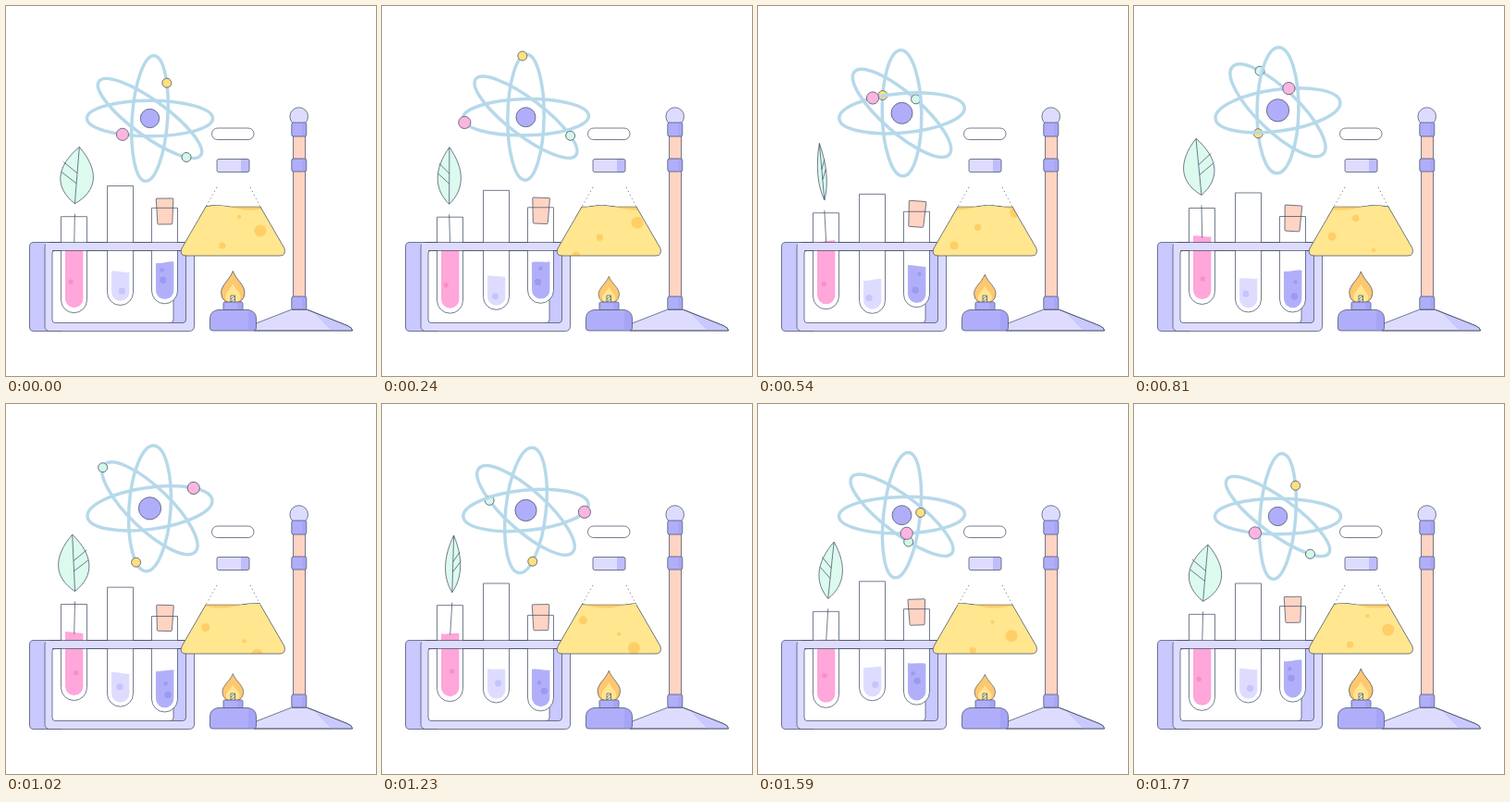
Write an HTML page that moves like this. It is 400x400 px and loops after 1800 ms.

```html
<!DOCTYPE html>
<html lang="en">
<head>
<meta charset="utf-8">
<title>Chemistry set</title>
<style>
  html, body { margin: 0; width: 100%; height: 100%; overflow: hidden; background: #fff; }
  svg { display: block; width: 100%; height: 100%; }
  .ink { stroke: #465068; stroke-width: .75; stroke-linejoin: round; }
  .line { fill: none; }
  .pale { fill: #dddcff; }
  .mid { fill: #c9c8ff; }
  .deep { fill: #b0aefa; }
  .shade { fill: #9c9af0; }
  .skin { fill: #ffd4c2; }
  .orbit { fill: none; stroke: #b6d9ea; stroke-width: 3.5; }
  .glass { fill: #fff; }
  .orange { fill: #ffce66; }
  .rim { stroke-width: 1.3; paint-order: stroke; }
  .leaf path { vector-effect: non-scaling-stroke; }
</style>
</head>
<body>
<svg viewBox="0 0 400 400" xmlns="http://www.w3.org/2000/svg">
  <defs>
    <clipPath id="flaskClip">
      <path d="M216 205H275V217L301 262Q303 270 296 270H195Q187 270 190 262L216 217Z"/>
    </clipPath>
    <clipPath id="brewClip"><path id="brewEdge"/></clipPath>
  </defs>

  <!-- atom -->
  <g id="atom">
    <g id="diag"><ellipse class="orbit" rx="68" ry="20"/><circle class="ink" r="5" fill="#d3f8e8"/></g>
    <g id="tall"><ellipse class="orbit" rx="68" ry="20"/><circle class="ink" r="5" fill="#ffe07f"/></g>
    <g id="flat"><ellipse class="orbit" rx="68" ry="20"/><circle class="ink" r="6.6" fill="#fbb6e0"/></g>
    <circle id="nucleus" class="ink deep" r="10"/>
  </g>

  <!-- rack, back part -->
  <path class="ink mid" d="M30 255.500H60V351.500H30Q25.500 351.500 25.500 347V260Q25.500 255.500 30 255.500Z"/>
  <rect class="ink pale" x="42" y="255.500" width="161.500" height="96" rx="5"/>
  <path class="ink mid" d="M176 264.500H194.500V339Q194.500 342.500 191 342.500H176Z"/>
  <path class="ink glass" d="M53 264.500H181V339Q181 342.500 178 342.500H53Q50 342.500 50 339V267Q50 264.500 53 264.500Z"/>

  <!-- leaf and tubes -->
  <g id="leaf" class="leaf">
    <path class="ink" fill="#dcfaee" d="M0 0C-25-16-25-38 0-61.500C25-38 25-16 0 0Z"/>
    <path class="ink line" d="M0-61.500V0M-16.500-44L0-33M-18-33L0-22"/>
  </g>
  <g id="tube1">
    <path class="glass" d="M59.500 0H87.500V90A14 14 0 0 1 59.500 90Z"/>
    <path id="liquid1" fill="#ffa6da"/>
    <circle id="drop1" r="2.700" fill="#f78fcb"/>
    <path id="stem" class="ink line"/>
    <path class="ink line" d="M59.500 0H87.500V90A14 14 0 0 1 59.500 90Z"/>
  </g>
  <g id="tube2">
    <path class="glass ink" d="M109.500 0H137.500V115A14 14 0 0 1 109.500 115Z"/>
    <path id="liquid2" fill="#dddcff"/>
    <circle id="drop2" r="3.600" fill="#c6c4fd"/>
  </g>
  <path id="back3" class="glass" d="M157.500 0H185.500V89.500A14 14 0 0 1 157.500 89.500Z"/>
  <path id="cork" class="ink skin" d="M-8.500-14H8.500Q9.500-14 9.300-13L8 13Q8 14 7 14H-7Q-8 14-8 13L-9.300-13Q-9.500-14-8.500-14Z"/>
  <g id="tube3">
    <path id="liquid3" fill="#b1affa"/>
    <circle id="drop3" class="shade" r="3.700"/>
    <circle id="drop4" class="shade" r="2.200"/>
    <path class="ink line" d="M157.500 0H185.500V89.500A14 14 0 0 1 157.500 89.500Z"/>
  </g>

  <!-- rack, front bar -->
  <path class="pale" d="M43 256H199Q203 256 203 260V264H43Z"/>
  <path class="ink line" d="M47 255.500H199Q203.500 255.500 203.500 260M50 264.500H194.500"/>

  <!-- flask -->
  <rect class="ink glass" x="222.500" y="132" width="45.500" height="12.500" rx="6.200"/>
  <rect class="pale" x="228" y="165.500" width="35" height="14" rx="2"/>
  <path class="deep" d="M254 165.500H261Q263 165.500 263 167.500V177.500Q263 179.500 261 179.500H254Z" opacity=".7"/>
  <rect class="ink line" x="228" y="165.500" width="35" height="14" rx="2"/>
  <path class="ink line" stroke-dasharray="1.200 3.200" d="M228 196L216 217M264 196L275 217"/>
  <g clip-path="url(#flaskClip)">
    <use href="#brewEdge" class="ink line rim"/>
    <rect class="ink orange rim" x="185" y="217.300" width="120" height="10"/>
    <path id="brew" fill="#ffe68f"/>
    <g id="bubbles" class="orange" clip-path="url(#brewClip)"></g>
  </g>
  <path class="ink line" d="M216 217L190 262Q187 270 195 270H296Q303 270 301 262L275 217"/>

  <!-- stand -->
  <path class="ink pale" d="M309 328H325L369 345.500Q374.500 347.500 374.500 351H268V344Z"/>
  <path class="mid" d="M334 333L369 346Q374 348 374 350.600H351Z"/>
  <path class="ink line" d="M309 328H325L369 345.500Q374.500 347.500 374.500 351H268"/>
  <rect class="ink skin" x="310.500" y="135" width="13" height="185"/>
  <circle class="ink pale" cx="316.700" cy="119.500" r="9.800"/>
  <g id="collars"></g>

  <!-- burner -->
  <g id="flame">
    <path class="ink" fill="#ffc870" d="M0-34C3.500-24 12.500-19 12.500-10Q12.500-4 7.500 0H-7.500Q-12.500-4-12.500-10C-12.500-19-3.500-24 0-34Z"/>
    <path fill="#ffe68f" d="M0-20C3-13 8-11 8-5Q8-2 5 0H-5Q-8-2-8-5C-8-11-3-13 0-20Z"/>
  </g>
  <rect class="ink" x="243" y="313" width="4.500" height="8" fill="#fff3cf"/>
  <path class="ink line" d="M243 317L247.500 313.500M243 320L247.500 316.500"/>
  <rect class="ink deep" x="235" y="320" width="21" height="9" rx="1.500"/>
  <path class="ink deep" d="M229 328.500H262Q270.500 330 270.500 338V348Q270.500 351 267.500 351H223.500Q220.500 351 220.500 348V338Q220.500 330 229 328.500Z"/>
  <path class="shade" opacity=".45" d="M250 320.500H255.500V328H250ZM262 329Q270 331 270 338V348Q270 350.500 267 350.500H262Z"/>
</svg>

<script>
const LOOP = 1800, STEP = 30, TAU = Math.PI * 2;
const NS = "http://www.w3.org/2000/svg";
const $ = id => document.getElementById(id);
let t = 0;

const wrap = v => ((v % 1) + 1) % 1;
const clamp = v => Math.min(1, Math.max(0, v));
const osc = (mid, amp, peak, period = LOOP) => mid + amp * Math.cos(TAU * (t - peak) / period);
const put = (id, value) => $(id).setAttribute("transform", value);
const shape = (id, d) => $(id).setAttribute("d", d);

function add(parent, tag, attrs) {
  const el = document.createElementNS(NS, tag);
  for (const key in attrs) el.setAttribute(key, attrs[key]);
  return $(parent).appendChild(el);
}

for (const [y, h] of [[126, 15], [165, 14], [314, 14]]) {
  add("collars", "rect", { class: "ink deep", x: 308.8, y, width: 16, height: h, rx: 2 });
  add("collars", "rect", { class: "shade", x: 320.5, y: y + .6, width: 3.6, height: h - 1.2, opacity: .45 });
}

// Start of the rise in ms, x there, sideways drift, radius
const bubbles = [[841, 270.7, 8, 6.5], [1280, 230, 13, 3.6], [20, 208, 14, 4.5], [427, 261.7, -12.5, 2.1]]
  .map(([birth, x, drift, r]) => ({ birth, x, drift, r, el: add("bubbles", "circle", {}) }));

// An electron runs at constant speed along its orbit, which widens and narrows
function orbit(id, angle, start, dir) {
  const group = $(id), [path, dot] = group.children;
  group.setAttribute("transform", `rotate(${angle})`);
  path.setAttribute("ry", osc(20.9, 1.7, 930));
  const p = path.getPointAtLength(wrap(start + dir * t / LOOP) * path.getTotalLength());
  dot.setAttribute("cx", p.x);
  dot.setAttribute("cy", p.y);
}

function liquid(id, x, top, bottom, peak) {
  const w = 19.4, r = w / 2, d = osc(0, 1, peak, 900), s = osc(0, 1.4, peak + 225, 900);
  shape(id, `M${x} ${top + d}C${x + 6} ${top + d - s} ${x + 13} ${top - d + s} ${x + w} ${top - d}` +
    `V${bottom - r}A${r} ${r} 0 0 1 ${x} ${bottom - r}Z`);
}

function drop(id, x, y) {
  $(id).setAttribute("cx", x);
  $(id).setAttribute("cy", y);
}

function drawAtom() {
  put("atom", `translate(155.5 ${osc(117, 4.5, 15)})`);
  $("nucleus").setAttribute("r", osc(11.2, 1, 900));
  orbit("diag", osc(40.1, 4, 915), .055, -1);
  orbit("tall", osc(3, 4, 1420) - 90, .116, -1);
  orbit("flat", osc(-4, 4, 15), .35, 1);
}

function drawTubes() {
  const top1 = osc(222.5, 6, 150), top3 = osc(223.5, 6, 1050);
  const leafX = osc(74, 2.2, 1400);
  put("leaf", `translate(${leafX} ${top1 - 14}) rotate(${osc(0, 6, 1600)}) scale(${Math.cos(TAU * (t - 15) / LOOP) * .95} 1)`);
  put("tube1", `translate(0 ${top1})`);
  shape("stem", `M${leafX} -3L73.7 32`);
  liquid("liquid1", 64, 30.5, 98.5, 540);
  drop("drop1", osc(72.5, 3.3, 1100), osc(73, 4, 650));

  put("tube2", `translate(0 ${osc(197.5, 6, 600)})`);
  liquid("liquid2", 114, 92.7, 124.5, 600);
  drop("drop2", osc(123.5, 3.5, 1500), osc(111, 3.5, 200));

  put("back3", `translate(0 ${top3})`);
  put("tube3", `translate(0 ${top3})`);
  put("cork", `translate(171.7 ${osc(226.3, 5.2, 1070)}) rotate(${osc(1, 3, 600)})`);
  liquid("liquid3", 162, 58.8, 98.8, 70);
  drop("drop3", osc(172, 3.5, 1150), osc(82, 4.5, 780));
  drop("drop4", osc(171.3, 3.7, 680), osc(69.5, 3.5, 1150));
}

function drawFlask() {
  const wave = 72;
  let d = "M185 275";
  for (let x = 185; x <= 305; x += 3) {
    d += `L${x} ${218.2 + 2.4 * Math.cos(TAU * ((x - 264) / wave - t / LOOP))}`;
  }
  d += "V275Z";
  shape("brew", d);
  shape("brewEdge", d);
  for (const b of bubbles) {
    const k = wrap((t - b.birth) / LOOP);
    b.el.setAttribute("cx", b.x + b.drift * k);
    b.el.setAttribute("cy", 278 - 65.7 * k);
    b.el.setAttribute("r", b.r * clamp((.86 - k) * 30));
  }
}

function drawFlame() {
  const tall = (320 - osc(289.6, 3.5, 190, 450)) / 34;
  put("flame", `translate(245.3 320) scale(${.88 + (tall - .79) * .7} ${tall})`);
}

function frame(now) {
  t = Math.floor(now / STEP) * STEP % LOOP;
  drawAtom();
  drawTubes();
  drawFlask();
  drawFlame();
}

const start = performance.now();
function tick() {
  frame(performance.now() - start);
  requestAnimationFrame(tick);
}
tick();
</script>
</body>
</html>
```
